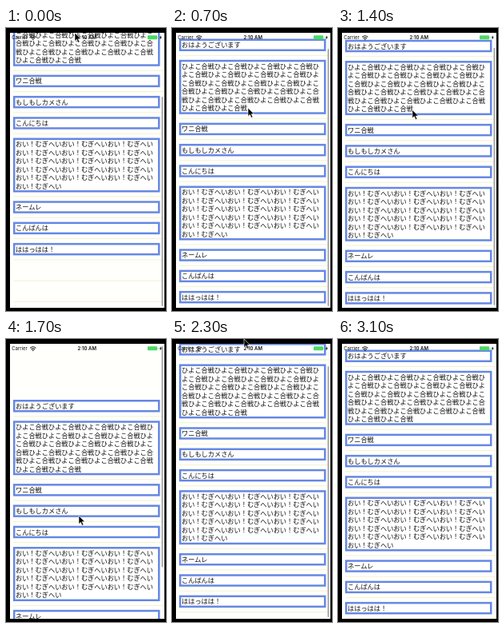
Animation of 200 by 354 pixels, one loop 3.2 s. Source, as an HTML page:

```html
<!DOCTYPE html>
<html lang="ja">
<head>
<meta charset="utf-8">
<title>Bouncing list</title>
<style>
  html, body { margin: 0; width: 100%; height: 100%; overflow: hidden; background: #000; }
  svg { display: block; position: absolute; left: 0; top: 0; }
  .cell { fill: #fff; stroke: #6688e4; stroke-width: 2.5; }
  .label { font: 8.2px "Noto Sans CJK JP", "Noto Sans CJK", sans-serif; fill: #111; }
  .status { font: 6px Inter, sans-serif; fill: #111; }
  .rule { stroke: #f4f2d4; stroke-width: 1; }
</style>
</head>
<body>
<svg width="200" height="354" viewBox="0 0 200 354">
  <clipPath id="screen"><rect x="5" y="6" width="193" height="344"/></clipPath>
  <rect x="5" y="6" width="193" height="344" fill="#fffffc"/>
  <g clip-path="url(#screen)">
    <g id="list"></g>
    <rect id="thumb" x="194.6" width="1.4" rx=".7" fill="#777" opacity=".75"/>
  </g>
  <g class="status">
    <text x="7.2" y="14.2">Carrier</text>
    <g fill="none" stroke="#111" stroke-width="1.1">
      <path d="M30.2 11.4q3.6-3.2 7.2 0M31.6 13q2.2-1.9 4.4 0"/>
    </g>
    <path d="M32.6 13.9q1.2-.9 2.4 0l-1.2 1.3z"/>
    <text x="101.2" y="14.2" text-anchor="middle" font-weight="600">2:10 AM</text>
    <rect x="177" y="9.3" width="12" height="5" rx="1" fill="#4cd964"/>
    <path d="M189.6 11h.9v1.6h-.9z" fill="#4cd964"/>
    <path d="M194 9.2l-2.4 3h1.4l-.5 2.4 2.4-3.1h-1.4z"/>
  </g>
  <path id="cursor" d="M0 0V10.4L2.4 8.2 4.1 12.2 5.9 11.4 4.2 7.6H7.5Z"
        fill="#000" stroke="#fff" stroke-width=".6"/>
</svg>
<script>
const LOOP = 3200, STEP = 100;
const LINE = 10.5, PAD = 2.5, GAP = 10.8, PER_LINE = 21;
const messages = [
  'おはようございます',
  'ひよこ合戦'.repeat(23),
  'ワニ合戦',
  'もしもしカメさん',
  'こんにちは',
  'おい！むぎへい'.repeat(16),
  'ネームレ',
  'こんばんは',
  'ははっはは！'
];

const list = document.getElementById('list');
const thumb = document.getElementById('thumb');
const cursor = document.getElementById('cursor');

function add(tag, attrs, text = '') {
  const node = document.createElementNS('http://www.w3.org/2000/svg', tag);
  for (const key in attrs) node.setAttribute(key, attrs[key]);
  node.textContent = text;
  list.append(node);
}

function addRule(y) {
  add('line', { class: 'rule', x1: 9, x2: 198, y1: y, y2: y });
}

function buildList() {
  let y = 13.5;
  for (const message of messages) {
    const lines = message.match(new RegExp(`.{1,${PER_LINE}}`, 'g'));
    const height = lines.length * LINE + 2 * PAD;
    add('rect', { class: 'cell', x: 10.2, y: y + 1.25, width: 181, height: height - 2.5 });
    lines.forEach((line, i) =>
      add('text', { class: 'label', x: 12, y: y + PAD + i * LINE + 8.3 }, line));
    y += height + GAP;
    addRule(y - GAP / 2);
  }
  for (let i = 1; i <= 3; i++) addRule(y - GAP / 2 + i * 26.3);
}

// Rows of [time, value, ...], eased between neighbours.
const dragSteps = [[600, -1], [700, 0], [1000, -25], [1200, -32], [1700, 62.5], [2000, -42]];
const cursorSteps = [
  [0, 86, 6], [400, 90, 28], [700, 95, 100], [1000, 95, 53],
  [1200, 94, 38], [1700, 91, 221], [2000, 90, 3], [2100, 90, 0], [2500, 90, 0]
];

function sample(steps, t) {
  const next = steps.findIndex(step => step[0] > t);
  if (next < 1) return steps.at(next).slice(1);
  const a = steps[next - 1], b = steps[next];
  const p = (t - a[0]) / (b[0] - a[0]);
  const eased = p * p * (3 - 2 * p);
  return a.slice(1).map((v, i) => v + (b[i + 1] - v) * eased);
}

// Critically damped return to rest.
function spring(from, ms) {
  const x = ms / 100;
  return from * (1 + x) * Math.exp(-x);
}

function offsetAt(t) {
  if (t < 600) return spring(-60, t);
  if (t < 2000) return sample(dragSteps, t)[0];
  return spring(-42, t - 2000);
}

function draw(now) {
  const t = Math.floor((now % LOOP) / STEP) * STEP;
  const offset = offsetAt(t);
  list.setAttribute('transform', `translate(0 ${offset.toFixed(2)})`);

  const thumbTop = Math.max(9, 26 - offset);
  const thumbEnd = 348 - Math.max(0, offset);
  thumb.setAttribute('y', thumbTop);
  thumb.setAttribute('height', thumbEnd - thumbTop);
  thumb.style.visibility = t < 3000 ? 'visible' : 'hidden';

  const [x, y] = sample(cursorSteps, t);
  cursor.setAttribute('transform', `translate(${x} ${y})`);
  cursor.style.visibility = t < 2500 ? 'visible' : 'hidden';
}

buildList();
const began = performance.now();
function tick() {
  draw(performance.now() - began);
  requestAnimationFrame(tick);
}
tick();
</script>
</body>
</html>
```
